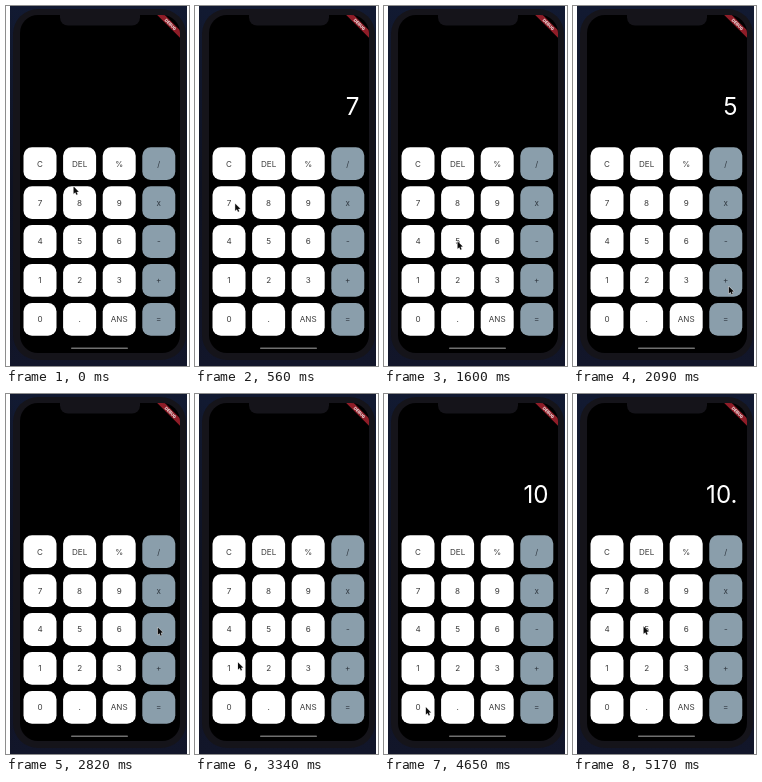
These frames come from a looping animation (183x360 px, 5.2 s). An HTML page with a canvas:

```html
<!DOCTYPE html>
<html lang="en">
<head>
<meta charset="utf-8">
<title>Calculator</title>
<style>
html, body { margin: 0; width: 100%; height: 100%; overflow: hidden; background: #fff; }
canvas { display: block; width: 183px; height: 360px; }
</style>
</head>
<body>
<canvas id="stage"></canvas>
<script>
const W = 183, H = 360, LOOP = 5200;
const REST = 200, CLICK = 150;
const FONT = 'Inter, Roboto, sans-serif';
const BEZEL = '#15141a';
const KEYS = 'C DEL % / 7 8 9 x 4 5 6 - 1 2 3 + 0 . ANS ='.split(' ');

const canvas = document.getElementById('stage');
const ctx = canvas.getContext('2d');
const ratio = window.devicePixelRatio || 1;
canvas.width = W * ratio;
canvas.height = H * ratio;

function keyCenter(key) {
  const n = KEYS.indexOf(key);
  return { x: 34 + (n % 4) * 39.6, y: 157.7 + Math.floor(n / 4) * 38.9 };
}

// Pointer stop: arrival time, key, offset from the key's center
function stop(time, key, dx = 0, dy = 0, press = true) {
  const { x, y } = keyCenter(key);
  return { time, key, press, x: x + dx, y: y + dy };
}

const STOPS = [
  stop(0, '8', -6, -16, false),
  stop(330, '7', 5),
  stop(1080, '=', 18, -3),
  stop(1460, '5'),
  stop(2090, '+', 3, 6),
  stop(2820, '-', -1, -2),
  stop(3340, '1', 9, -6),
  stop(4170, '.', -9, -8, false),
  stop(4440, '0', 4),
  stop(4790, '.'),
  stop(5170, '5', -3, -3)
];

// Digits append, operators clear
function valueAt(t) {
  return STOPS.filter(s => s.press && s.time + CLICK <= t)
    .reduce((text, s) => /[\d.]/.test(s.key) ? text + s.key : '', '');
}

function pointerAt(t) {
  const i = STOPS.findLastIndex(s => s.time <= t);
  const a = STOPS[i], b = STOPS[i + 1] || a;
  const gap = b.time - a.time;
  const rest = Math.min(REST, gap / 2);
  const u = gap ? Math.max(0, (t - a.time - rest) / (gap - rest)) : 0;
  const e = u * u * (3 - 2 * u);
  return [a.x + (b.x - a.x) * e, a.y + (b.y - a.y) * e];
}

function box(x, y, w, h, r, fill) {
  ctx.beginPath();
  ctx.roundRect(x, y, w, h, r);
  ctx.fillStyle = fill;
  ctx.fill();
}

function label(text, x, y, size, color, weight = 400) {
  ctx.font = `${weight} ${size}px ${FONT}`;
  ctx.fillStyle = color;
  ctx.fillText(text, x, y);
}

function drawBanner() {
  ctx.save();
  ctx.beginPath();
  ctx.roundRect(14, 9, 160, 338, 18);
  ctx.clip();
  ctx.translate(164.5, 18.5);
  ctx.rotate(Math.PI / 4);
  ctx.fillStyle = '#8f1d28';
  ctx.fillRect(-20, -2.7, 40, 5.4);
  ctx.textAlign = 'center';
  label('DEBUG', 0, 1.5, 4.2, '#f0e4e4', 800);
  ctx.restore();
}

function drawPhone() {
  ctx.fillStyle = '#fff';
  ctx.fillRect(0, 0, W, H);
  const sky = ctx.createLinearGradient(0, 0, 0, H);
  sky.addColorStop(0, '#121a32');
  sky.addColorStop(0.5, '#0e1222');
  sky.addColorStop(1, '#12162a');
  ctx.fillStyle = sky;
  ctx.fillRect(4, 0, 177, H);

  box(7, 3, 173, 351, 25, BEZEL);
  box(14, 9, 160, 338, 18, '#000');
  box(54, 4, 80, 15.5, [0, 0, 8, 8], BEZEL);
  drawBanner();
  box(65, 341.5, 57, 1.5, 0.7, '#707070');
}

function drawKeys() {
  ctx.textAlign = 'center';
  KEYS.forEach((key, n) => {
    const { x, y } = keyCenter(key);
    const operator = n % 4 === 3;
    box(x - 16.5, y - 16.4, 33, 32.8, 8.5, operator ? '#8a9eab' : '#fff');
    label(key, x, y + 2.9, 8.1, operator ? '#303840' : '#3c3c3c');
  });
}

function drawDisplay(t) {
  ctx.textAlign = 'right';
  label(valueAt(t), 164.5, 108.8, 24.2, '#fff');
}

function drawPointer(t) {
  ctx.save();
  ctx.translate(...pointerAt(t));
  ctx.beginPath();
  ctx.moveTo(0, 0);
  ctx.lineTo(0, 7.2);
  ctx.lineTo(1.7, 5.7);
  ctx.lineTo(2.8, 8.2);
  ctx.lineTo(4, 7.7);
  ctx.lineTo(2.9, 5.3);
  ctx.lineTo(5.1, 5.1);
  ctx.closePath();
  ctx.lineJoin = 'round';
  ctx.lineWidth = 1;
  ctx.strokeStyle = '#ddd';
  ctx.stroke();
  ctx.fillStyle = '#0a0a0a';
  ctx.fill();
  ctx.restore();
}

function draw(t) {
  ctx.setTransform(ratio, 0, 0, ratio, 0, 0);
  drawPhone();
  drawKeys();
  drawDisplay(t);
  drawPointer(t);
}

const start = performance.now();
function tick() {
  draw((performance.now() - start) % LOOP);
  requestAnimationFrame(tick);
}
tick();
</script>
</body>
</html>
```
